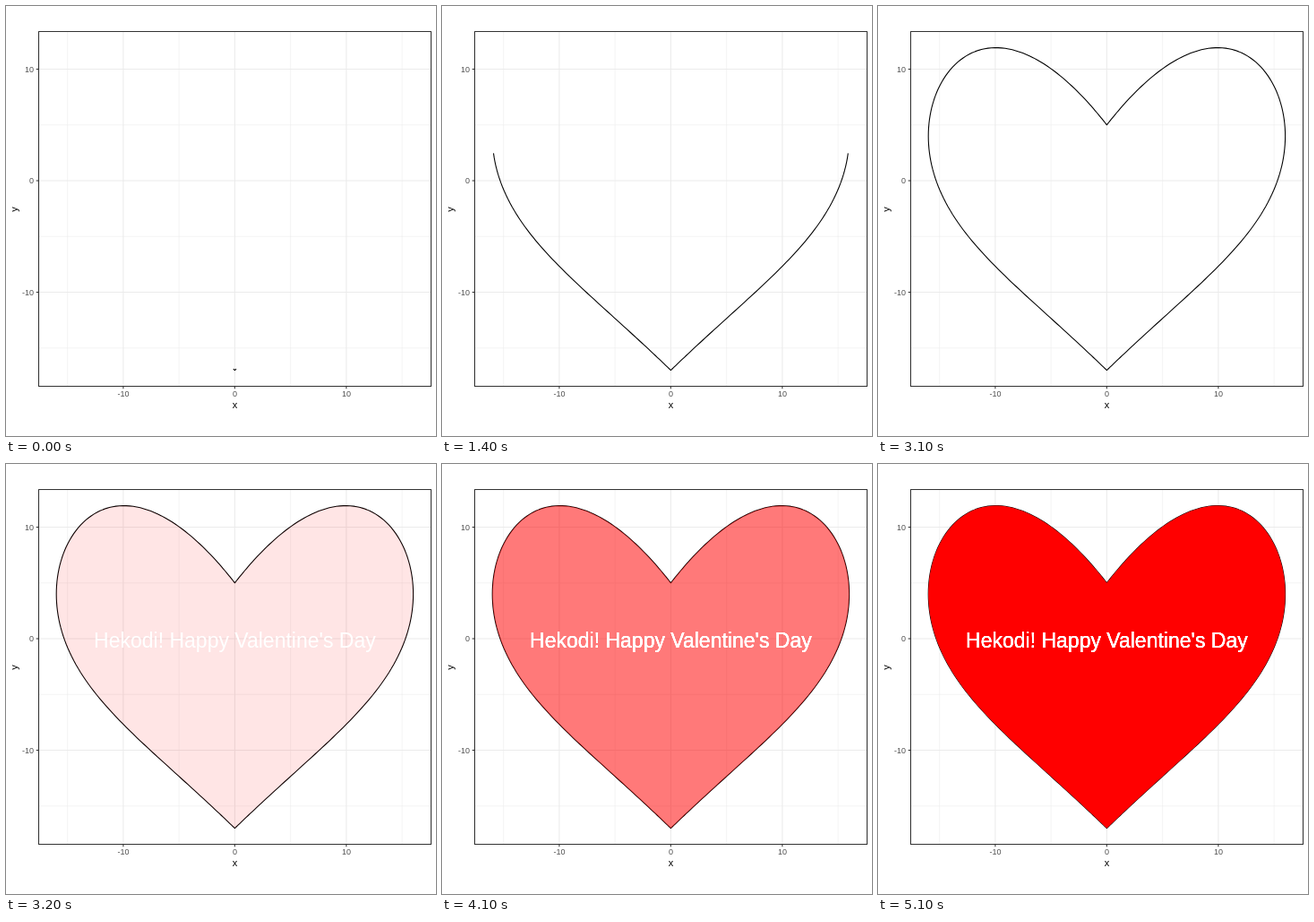
Recreate the animation shown at these times as an HTML page with a canvas. Size 480 by 480 pixels, loop 5.2 s.

```html
<!DOCTYPE html>
<html lang="en">
<head>
<meta charset="utf-8">
<title>Heart plot</title>
<style>
  html, body { margin: 0; width: 100%; height: 100%; overflow: hidden; background: #fff; }
  canvas { display: block; width: 480px; height: 480px; }
</style>
</head>
<body>
<canvas id="stage" width="480" height="480"></canvas>
<script>
const ctx = document.getElementById('stage').getContext('2d');
const STEP_MS = 100, DRAW_STEPS = 32, FILL_STEPS = 20;
const UNIT = 12.45, LINE = 1.07;
const PANEL = { left: 36.5, top: 28.5, right: 474.5, bottom: 424.5 };
const FONT = '"Liberation Sans", Arial, sans-serif';
const MESSAGE = "Hekodi! Happy Valentine's Day";

const px = x => 255.4 + x * UNIT;
const py = y => 195 - y * UNIT;

function line(x1, y1, x2, y2, color, width) {
  ctx.strokeStyle = color;
  ctx.lineWidth = width;
  ctx.beginPath();
  ctx.moveTo(x1, y1);
  ctx.lineTo(x2, y2);
  ctx.stroke();
}

function text(str, x, y, size, color, align = 'center') {
  ctx.font = `${size}px ${FONT}`;
  ctx.fillStyle = color;
  ctx.textAlign = align;
  ctx.fillText(str, x, y);
}

function drawGrid(values, width) {
  for (const v of values) {
    const x = px(v), y = py(v);
    if (x < PANEL.right) line(x, PANEL.top, x, PANEL.bottom, '#ebebeb', width);
    if (y > PANEL.top) line(PANEL.left, y, PANEL.right, y, '#ebebeb', width);
  }
}

function drawAxes() {
  ctx.strokeStyle = '#333';
  ctx.lineWidth = LINE;
  ctx.strokeRect(PANEL.left, PANEL.top, PANEL.right - PANEL.left, PANEL.bottom - PANEL.top);
  for (const v of [-10, 0, 10]) {
    line(px(v), PANEL.bottom, px(v), PANEL.bottom + 2.75, '#333', LINE);
    line(PANEL.left - 2.75, py(v), PANEL.left, py(v), '#333', LINE);
    text(v, px(v), 436, 9, '#4d4d4d');
    text(v, 31, py(v) + 3.4, 9, '#4d4d4d', 'right');
  }
  text('x', 255.4, 449, 11, '#000');
  ctx.save();
  ctx.translate(13, 227);
  ctx.rotate(-Math.PI / 2);
  text('y', 0, 0, 11, '#000');
  ctx.restore();
}

// The angle is measured from the bottom tip; its sign picks the side.
function heartPoint(angle) {
  const t = Math.PI - Math.abs(angle);
  const x = Math.sign(angle) * 16 * Math.sin(t) ** 2;
  const y = 13 * Math.cos(t) - 5 * Math.cos(2 * t) - 2 * Math.cos(3 * t) - Math.cos(4 * t);
  return [px(x), py(y)];
}

function traceHeart(reach) {
  const half = Math.max(4, Math.ceil(reach / 0.02));
  ctx.beginPath();
  for (let i = -half; i <= half; i++) ctx.lineTo(...heartPoint(reach * i / half));
  if (reach === Math.PI) ctx.closePath();
}

function render(step) {
  ctx.fillStyle = '#fff';
  ctx.fillRect(0, 0, 480, 480);
  drawGrid([-15, -5, 5, 15], 0.53);
  drawGrid([-10, 0, 10], LINE);

  const filling = step - DRAW_STEPS;
  traceHeart(filling < -1 ? 0.09 + 0.1 * step : Math.PI);
  ctx.lineJoin = 'round';
  ctx.strokeStyle = '#000';
  ctx.lineWidth = LINE;
  ctx.stroke();

  if (filling >= 0) {
    const alpha = 0.1 + 0.9 * filling / (FILL_STEPS - 1);
    ctx.fillStyle = `rgba(255, 0, 0, ${alpha})`;
    ctx.fill();
    // Repeated passes harden the glyph edges as the fill gets stronger.
    const passes = Math.min(4, 1 + filling);
    for (let i = 0; i < passes; i++) text(MESSAGE, 255.4, 204.5, 23, '#fff');
  }
  drawAxes();
}

function tick() {
  render(Math.floor(performance.now() / STEP_MS) % (DRAW_STEPS + FILL_STEPS));
  requestAnimationFrame(tick);
}
tick();
</script>
</body>
</html>
```
